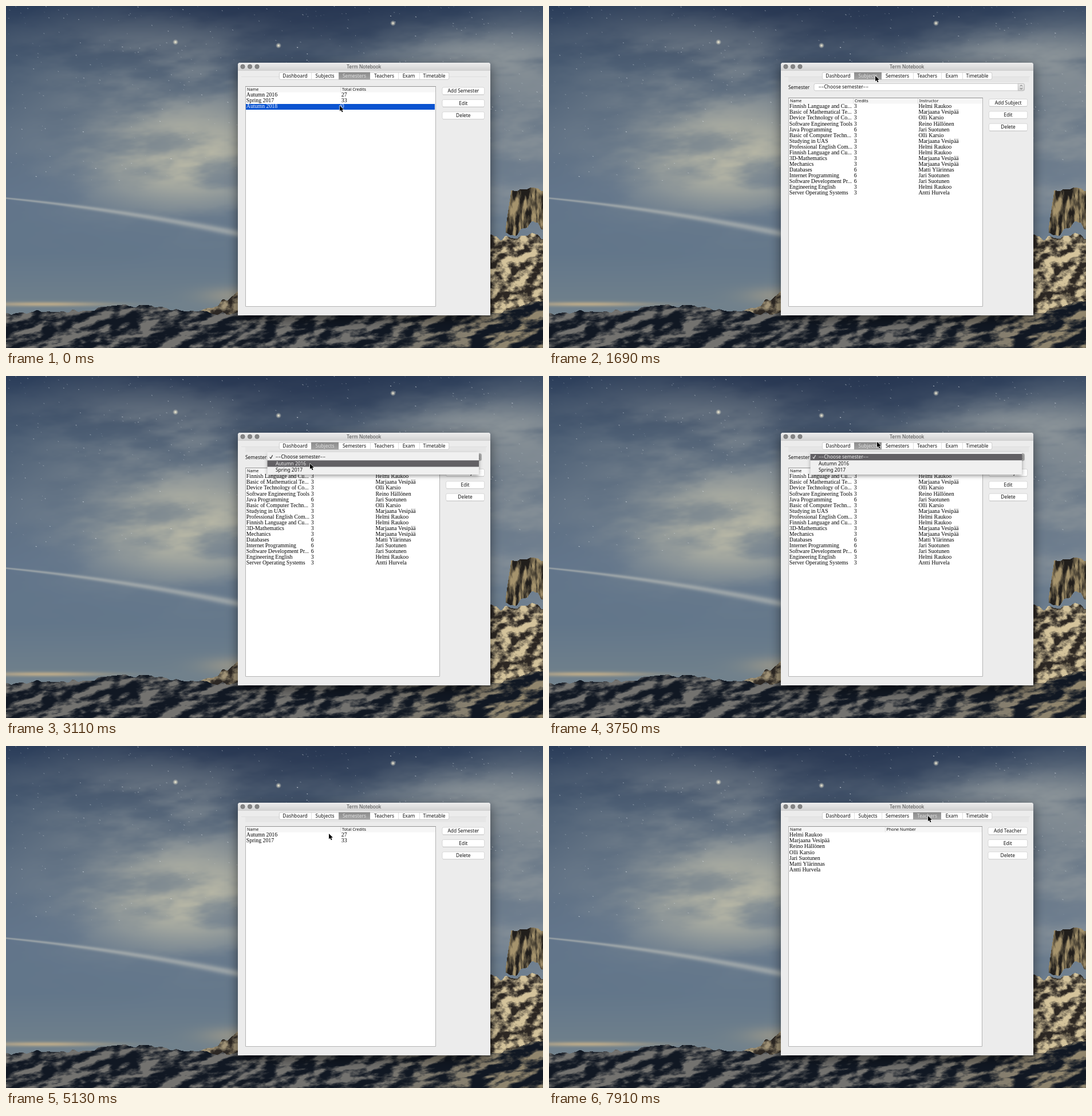
Animation of 938x597 px, one loop 8 s. Source, as an HTML page with a canvas:

```html
<!DOCTYPE html>
<html lang="en">
<head>
<meta charset="utf-8">
<title>Term Notebook</title>
<style>
  html, body { margin: 0; width: 100%; height: 100%; overflow: hidden; background: #2b3e5c; }
  canvas { display: block; }
</style>
</head>
<body>
<canvas id="stage" width="938" height="597"></canvas>
<script>
const W = 938, H = 597, LOOP = 8000;
const SANS = '"Noto Sans", "Open Sans", sans-serif';
const UI = '8.4px ' + SANS;
const HEAD = '7.2px ' + SANS;
const CELL = '9.85px "Liberation Serif", serif';
const TITLE = '8.3px Inter, sans-serif';
const ROW = 10.07;

const stage = document.getElementById('stage').getContext('2d');
let g = stage;

// ---------- helpers ----------
let seed = 7;
const rand = () => (seed = (seed * 16807) % 2147483647) / 2147483647;
const between = (a, b) => a + (b - a) * rand();
const clamp = v => Math.min(1, Math.max(0, v));
const ease = p => p * p * (3 - 2 * p);
const lerp = (a, b, p) => a + (b - a) * p;
const rgb = hex => [1, 3, 5].map(i => parseInt(hex.slice(i, i + 2), 16));
const mix = (a, b, p) => [lerp(a[0], b[0], p), lerp(a[1], b[1], p), lerp(a[2], b[2], p)];

function rect(x, y, w, h, fill) {
  g.fillStyle = fill;
  g.fillRect(x, y, w, h);
}

function round(x, y, w, h, r, fill, stroke) {
  g.beginPath();
  g.roundRect(x, y, w, h, r);
  g.fillStyle = fill;
  g.fill();
  if (stroke) { g.strokeStyle = stroke; g.lineWidth = 0.7; g.stroke(); }
}

function vertical(y0, y1, from, to) {
  const grad = g.createLinearGradient(0, y0, 0, y1);
  grad.addColorStop(0, from);
  grad.addColorStop(1, to);
  return grad;
}

function line(color, width, ...points) {
  g.strokeStyle = color;
  g.lineWidth = width;
  g.beginPath();
  points.forEach(p => g.lineTo(...p));
  g.stroke();
}

function text(str, x, y, font, color = '#111', align = 'left') {
  g.font = font;
  g.fillStyle = color;
  g.textAlign = align;
  g.fillText(str, x, y);
}

// ---------- wallpaper: noise clouds over a gradient, relief-lit rocks ----------
const lattice = Float32Array.from({ length: 4096 }, rand);
const cell = (x, y) => lattice[(y & 63) * 64 + (x & 63)];

function noise(x, y) {
  const i = Math.floor(x), j = Math.floor(y), u = ease(x - i), v = ease(y - j);
  return lerp(lerp(cell(i, j), cell(i + 1, j), u), lerp(cell(i, j + 1), cell(i + 1, j + 1), u), v);
}

function fbm(x, y) {
  let sum = 0;
  for (let k = 0, amp = 0.5; k < 5; k++, amp /= 2) {
    sum += amp * noise(x, y);
    x = x * 2 + 17;
    y = y * 2 + 5;
  }
  return sum;
}

const bump = (x, y, cx, cy, rx, ry) => Math.exp(-(((x - cx) / rx) ** 2) - ((y - cy) / ry) ** 2);
const relief = (u, v) => clamp(0.46 + 4 * (fbm(u, v) - fbm(u + 0.3, v + 0.3)));

const SKY = ['#2a3d5a', '#42566f', '#5a6c81', '#61748a', '#62768a', '#72828c'].map(rgb);
const [NAVY, HAZE, CREAM, TRAIL, SUNSET] = ['#202e4a', '#8f979b', '#c8c4ab', '#b3b7b4', '#c9b28a'].map(rgb);
const [NIGHT, STONE, SHADE, SNOW, CRAG, SUNLIT] =
  ['#111823', '#73726f', '#2c2723', '#d4c39b', '#211e1b', '#a5936c'].map(rgb);

function skyColor(x, y) {
  const band = Math.min(4.99, y / 108), i = Math.floor(band);
  const cloud = ease(clamp((fbm(x / 130 + y / 260, y / 48) - 0.26) / 0.42));
  const cover = 0.7 * bump(x, y, 300, 210, 210, 135) + 0.6 * bump(x, y, 790, 85, 200, 50)
    + 0.85 * bump(x, y, 940, 250, 180, 190) + 0.3 * bump(x, y, 220, 80, 250, 70);
  let c = mix(SKY[i], SKY[i + 1], band - i);
  c = mix(c, NAVY, 0.7 * bump(x, y, 470, 0, 330, 100));
  c = mix(c, HAZE, clamp(cover * (0.4 + 0.7 * cloud)));
  c = mix(c, CREAM, bump(x, y, 315, 265, 150, 75) * (0.3 + 0.6 * cloud));
  c = mix(c, SUNSET, 0.8 * bump(x, y, 65, 520, 110, 4) + 0.4 * bump(x, y, 400, 505, 60, 15));
  const off = y - (335 + 0.1 * x + 0.00013 * x * x);
  return mix(c, TRAIL, 0.65 * Math.exp(-((off / (1.4 + x * 0.013)) ** 2)));
}

function wallpaperColor(x, y) {
  const jag = noise(x / 9, 3) - 0.5;
  const range = 537 - 14 * bump(x, 0, 225, 0, 95, 1) - 5 * bump(x, 0, 75, 0, 35, 1)
    - 24 * clamp((x - 850) / 88) + 6 * jag;
  if (y > range) {
    const light = relief(x / 34, (y + x * 0.12) / 15) ** 1.35;
    return mix(NIGHT, mix(STONE, SUNLIT, 0.6 * clamp((x - 640) / 250)), light);
  }
  if (x > 330 && x < 420 && y > 532 - (x - 345) * 0.53 + 8 * jag) {
    return mix(SHADE, SNOW, 0.7 * relief(x / 20, y / 14));
  }
  if (x > 872 && y > 320 + 7 * Math.max(0, 882 - x) + 9 * jag && y < 398 - (x - 872) * 0.25 + 25 * jag) {
    return mix(CRAG, SUNLIT, relief(x / 9, y / 38));
  }
  if (x > 840 && y > 402 + 14 * jag) {
    return mix(SHADE, SNOW, relief((x - y * 0.4) / 20, (y + x * 0.2) / 15));
  }
  return skyColor(x, y);
}

function paintWallpaper() {
  const image = g.createImageData(W, H);
  for (let y = 0, i = 0; y < H; y++) {
    for (let x = 0; x < W; x++, i += 4) {
      image.data.set(wallpaperColor(x, y), i);
      image.data[i + 3] = 255;
    }
  }
  g.putImageData(image, 0, 0);
  for (let i = 0; i < 420; i++) {
    const x = between(0, W), y = 310 * rand() ** 1.4;
    line(`rgba(222,228,234,${between(0.15, 0.8)})`, between(0.6, 1.1), [x, y], [x + between(0.7, 2.2), y + between(0.3, 1.1)]);
  }
  for (const [x, y] of [[296, 63], [476, 69], [676, 30]]) {
    const halo = g.createRadialGradient(x, y, 0, x, y, 5);
    halo.addColorStop(0, '#fff7df');
    halo.addColorStop(0.35, 'rgba(255,247,220,.6)');
    halo.addColorStop(1, 'rgba(255,247,220,0)');
    rect(x - 5, y - 5, 10, 10, halo);
  }
}

// ---------- window ----------
const teachers = ['Helmi Raukoo', 'Marjaana Vesipää', 'Reino Hällönen', 'Olli Karsio',
  'Jari Suotunen', 'Matti Ylärinnas', 'Antti Hurvela'];
const subjects = `Finnish Language and Cu...|3|Helmi Raukoo
Basic of Mathematical Te...|3|Marjaana Vesipää
Device Technology of Co...|3|Olli Karsio
Software Engineering Tools|3|Reino Hällönen
Java Programming|6|Jari Suotunen
Basic of Computer Techn...|3|Olli Karsio
Studying in UAS|3|Marjaana Vesipää
Professional English Com...|3|Helmi Raukoo
Finnish Language and Cu...|3|Helmi Raukoo
3D-Mathematics|3|Marjaana Vesipää
Mechanics|3|Marjaana Vesipää
Databases|6|Matti Ylärinnas
Internet Programming|6|Jari Suotunen
Software Development Pr...|6|Jari Suotunen
Engineering English|3|Helmi Raukoo
Server Operating Systems|3|Antti Hurvela`.split('\n').map(row => row.split('|'));
const semesters = [['Autumn 2016', '27'], ['Spring 2017', '33'], ['Autumn 2018', '0']];
const choices = ['\u2212\u2212Choose semester\u2212\u2212', 'Autumn 2016', 'Spring 2017'];
const tabs = ['Dashboard', 'Subjects', 'Semesters', 'Teachers', 'Exam', 'Timetable'];
const tabEdges = [477, 533, 581, 636, 685, 722, 774];

function paintWindow() {
  g.save();
  g.shadowColor = 'rgba(0,0,0,.5)';
  g.shadowBlur = 20;
  g.shadowOffsetY = 7;
  round(405, 99, 441, 441, [4, 4, 0, 0], '#ececec');
  g.restore();
  round(405, 99, 441, 13, [4, 4, 0, 0], vertical(99, 112, '#ededed', '#d3d3d3'));
  rect(405, 112, 441, 0.6, '#bdbdbd');
  for (let i = 0; i < 3; i++) round(409.8 + i * 12.5, 102.1, 7.4, 7.4, 3.7, '#858585', '#6d6d6d');
  text('Term Notebook', 625, 109, TITLE, '#4b4b4b', 'center');
}

function paintTabs(active, strip) {
  if (strip) rect(418, 124, 420, 9, '#e6e6e6');
  rect(411, 123, 429, 0.7, '#dadada');
  round(477.4, 116, 296.4, 12.3, 2.5, '#fff', '#bdbdbd');
  tabs.forEach((name, i) => {
    const x = tabEdges[i], w = tabEdges[i + 1] - x, on = i === active;
    if (on) rect(x, 115.7, w, 12.8, vertical(116, 128, '#8c8c8c', '#a3a3a3'));
    else if (i && i - 1 !== active) rect(x, 116, 0.7, 12, '#d2d2d2');
    text(name, x + w / 2, 125, UI, on ? '#e0e0e0' : '#111', 'center');
  });
}

function paintButtons(x, y, noun) {
  ['Add ' + noun, 'Edit', 'Delete'].forEach((label, i) => {
    const top = y + i * 21.4, w = 835.7 - x;
    rect(x + 1, top + 12.4, w - 2, 1, '#c5c5c5');
    round(x, top, w, 12.6, 2.5, '#fff', '#cacaca');
    text(label, x + w / 2, top + 9.2, UI, '#111', 'center');
  });
}

// columns: [label, x]
function paintTable(y, right, columns, rows, selected = -1) {
  rect(418, y, right - 418, 525 - y, '#fff');
  rect(419, y + 1, right - 420, 9.5, '#f6f6f6');
  g.strokeStyle = '#b3b3b3';
  g.lineWidth = 1;
  g.strokeRect(418.5, y + 0.5, right - 419, 524 - y);
  rect(418, y, right - 418, 1, '#929292');
  columns.forEach(([label, x], i) => {
    if (i) rect(x - 2.6, y + 1, 0.7, 9.5, '#d4d4d4');
    text(label, x, y + 8.3, HEAD);
  });
  rows.forEach((row, r) => {
    const top = y + 10.8 + r * ROW, on = r === selected;
    if (on) {
      rect(419, Math.round(top), right - 421, 10, '#0a53d0');
      rect(columns[1][1] - 3, Math.round(top), 0.8, 10, '#c9d9f5');
    }
    row.forEach((str, c) => text(str, columns[c][1] - 1.2, top + 7.5, CELL, on ? '#f4f7ff' : '#000'));
  });
}

function paintMenu(hover) {
  g.save();
  g.shadowColor = 'rgba(0,0,0,.4)';
  g.shadowBlur = 7;
  g.shadowOffsetY = 2.5;
  rect(456.5, 133, 369.5, 39, '#f0f0f0');
  g.restore();
  rect(456.5, 136 + hover * 11.3, 369.5, 11.2, '#626064');
  choices.forEach((label, i) => text(label, 471, 144.3 + i * 11.3, UI, i === hover ? '#ededed' : '#111'));
  line(hover ? '#222' : '#ededed', 1.1, [460.8, 141.5], [462.5, 144], [465.6, 138.2]);
}

function paintSubjects(open, hover) {
  text('Semester', 418, 144.8, UI);
  round(463, 135.5, 367.5, 12.3, 2.5, '#fff', '#b9b9b9');
  round(819.2, 135.5, 11.3, 12.3, [0, 2.5, 2.5, 0], open ? '#a5a5a5' : vertical(135, 148, '#ececec', '#cfcfcf'), '#b3b3b3');
  for (const s of [-1, 1]) {
    const y = 141.6 + s * 1.5;
    line('#555', 0.9, [822.8, y], [824.8, y + s * 2.1], [826.8, y]);
  }
  text(choices[0], 471, 144.3, UI);
  paintTable(160, 758, [['Name', 421], ['Credits', 534], ['Instructor', 646.7]], subjects);
  paintButtons(768.5, 162.4, 'Subject');
  if (open) paintMenu(hover);
}

function paintCursor(x, y) {
  const arrow = new Path2D(`M${x} ${y}v9.6l2.2-2l1.6 3.6l1.7-.8l-1.6-3.4l2.9-.2z`);
  g.strokeStyle = '#fff';
  g.lineWidth = 1.2;
  g.lineJoin = 'round';
  g.stroke(arrow);
  g.fillStyle = '#000';
  g.fill(arrow);
}

// ---------- timeline ----------
// Each stop: [departure time, x, y]; travel time grows with the distance.
const stops = [
  [0, 583, 174], [260, 800, 190], [1110, 570, 122], [1920, 550, 140], [2260, 546, 153],
  [2750, 540, 167], [2900, 531, 153], [3170, 553, 122], [3580, 573, 115], [3870, 618, 121],
  [4430, 656, 143], [4650, 564, 153], [5720, 662, 122]
];

function cursorAt(time) {
  const t = Math.floor(time / 60) * 60;
  let [, x, y] = stops[0];
  for (const [start, nx, ny] of stops) {
    if (start > t) break;
    const p = ease(clamp((t - start) / (60 + 2 * Math.hypot(nx - x, ny - y))));
    x = lerp(x, nx, p);
    y = lerp(y, ny, p);
  }
  return [x, y];
}

const backdrop = document.createElement('canvas');
backdrop.width = W;
backdrop.height = H;
g = backdrop.getContext('2d');
paintWallpaper();
paintWindow();
g = stage;

function draw(t) {
  const [x, y] = cursorAt(t);
  const deleted = t >= 990;
  const view = t < 1680 ? 2 : t < 4310 ? 1 : t < 7910 ? 2 : 3;
  g.drawImage(backdrop, 0, 0);
  paintTabs(t >= 7790 ? 3 : view, t >= 1680);
  if (view === 1) {
    paintSubjects(t >= 2160 && t < 3930, y < 147 ? 0 : y < 158.5 ? 1 : 2);
  } else if (view === 2) {
    const selected = !deleted ? 2 : t >= 5250 ? 0 : -1;
    paintTable(140, 751, [['Name', 421], ['Total Credits', 587]],
      deleted ? semesters.slice(0, 2) : semesters, selected);
    paintButtons(762, 142, 'Semester');
  } else {
    paintTable(140, 757, [['Name', 421], ['Phone Number', 589.5]], teachers.map(name => [name]));
    paintButtons(767, 142, 'Teacher');
  }
  paintCursor(x, y);
}

let start;
function tick(now) {
  start ??= now;
  draw((now - start) % LOOP);
  requestAnimationFrame(tick);
}
draw(0);
requestAnimationFrame(tick);
</script>
</body>
</html>
```
